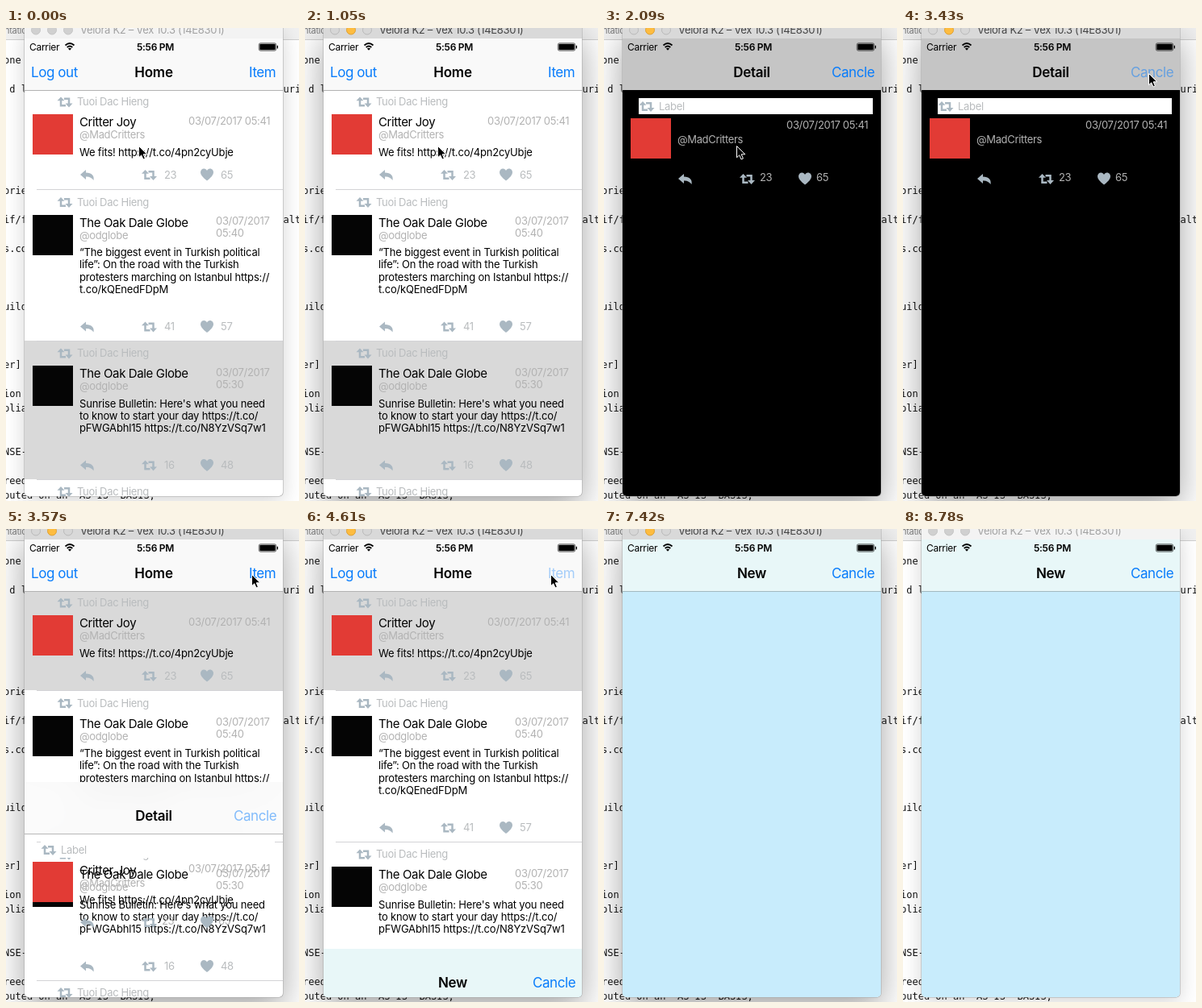
Animation of 363 by 587 pixels, one loop 8.88 s. Source, as an HTML page:

```html
<!DOCTYPE html>
<html lang="en">
<head>
<meta charset="utf-8">
<title>Modal demo</title>
<style>
  html, body { margin: 0; width: 100%; height: 100%; overflow: hidden; background: #fff; }
  svg { display: block; width: 363px; height: 587px; }
  text { font-family: Inter, "Open Sans", sans-serif; letter-spacing: -.025em; white-space: pre; }
  .code { font: 12px "DejaVu Sans Mono", monospace; letter-spacing: 0; fill: #111; }
  .name { font-size: 15px; }
  .body, .soft { font-size: 13px; }
  .body { letter-spacing: -.014em; }
  .soft { fill: #b2b2b2; }
  .faint { font-size: 13px; fill: #b9bcbe; }
  .title { font-size: 17px; font-weight: 600; text-anchor: middle; letter-spacing: -.015em; }
  .link { font-size: 17px; fill: #087cfb; }
  .icon { fill: #aab8c2; }
</style>
</head>
<body>
<svg id="stage" viewBox="0 0 363 587"></svg>
<script>
const LOOP = 8880;
const TICKS = [0, 1050, 1200, 1640, 1790, 1940, 2090, 2540, 2690, 2990, 3130,
  3430, 3570, 3720, 3870, 4020, 4320, 4470, 4620, 4770, 4920, 5060,
  5500, 5790, 5940, 6540, 6680, 6980, 7270, 7420, 8780];
const HEIGHT = 568;

const text = (x, y, cls, str, extra = '') =>
  `<text x="${x}" y="${y}" class="${cls}" ${extra}>${str}</text>`;
const rect = (x, y, w, h, fill, extra = '') =>
  `<rect x="${x}" y="${y}" width="${w}" height="${h}" fill="${fill}" ${extra}/>`;
const use = (id, x, y) => `<use href="#${id}" x="${x}" y="${y}"/>`;
const code = (y, str, col = 0) => text(-3 + col * 7.22, y, 'code', str);

const RED = '#e23b35';
const PERSON = 'Tuoi Dac Hieng';
const PALS = { name: 'Critter Joy', handle: '@MadCritters', color: RED,
  date: ['03/07/2017 05:41'], body: ['We fits! https://t.co/4pn2cyUbje'], counts: [23, 65] };
const GLOBE = { name: 'The Oak Dale Globe', handle: '@odglobe', color: '#050505' };

const actions = (y, textY, counts, x, cls) =>
  use('reply', 92, y - 6) + use('retweet', 168, y - 6) + use('heart', 241, y - 7.5) +
  text(x, textY, cls, counts[0]) + text(x + 70, textY, cls, counts[1]);

const retweeted = top => use('retweet', 63.5, top + 8) + text(88, top + 18.7, 'faint', PERSON);

function cell(top, iconY, post) {
  const dateX = post.date.length > 1 ? 260 : 226;
  return retweeted(top) +
    rect(33, Math.floor(top + 30), 50, 50, post.color) +
    text(91, top + 44.5, 'name', post.name) +
    text(91, top + 59.7, 'soft', post.handle) +
    post.date.map((s, i) => text(dateX, top + 42 + i * 15, 'soft', s)).join('') +
    post.body.map((s, i) => text(91, top + 81 + i * 15.4, 'body', s)).join('') +
    actions(iconY, iconY + 4.5, post.counts, 196, 'faint');
}

const separator = y => rect(38, y, 305, 1, '#d3d3d6');
const navBar = (id, fill, line, title, opacity = 1) =>
  rect(23, 13, 320, 64, fill, `opacity="${opacity}"`) +
  rect(23, 77, 320, 1, line, `id="${id}Line"`) +
  text(183, 61, 'title', title);

const home = rect(23, 13, 320, HEIGHT, '#fff') +
  rect(23, 78, 320, 122, '#d9d9d9', 'id="row1"') +
  rect(23, 388, 320, 172, '#d9d9d9', 'id="row3"') +
  cell(77.5, 182, PALS) + separator(200) +
  cell(202, 370.5, { ...GLOBE, date: ['03/07/2017', '05:40'], counts: [41, 57],
    body: ['“The biggest event in Turkish political', 'life”: On the road with the Turkish',
      'protesters marching on Istanbul https://', 't.co/kQEnedFDpM'] }) + separator(388) +
  cell(389.5, 542.5, { ...GLOBE, date: ['03/07/2017', '05:30'], counts: [16, 48],
    body: ["Sunrise Bulletin: Here's what you need", 'to know to start your day https://t.co/',
      'pFWGAbhl15 https://t.co/N8YzVSq7w1'] }) + separator(560) +
  retweeted(561) +
  navBar('home', '#f9f9f9', '#b2b2b2', 'Home') + text(31, 61, 'link', 'Log out') +
  text(301, 61, 'link', 'Item', 'id="item"');

// The translucent bar shows a blurred copy of the home screen behind it.
const glass = `<g id="glass" clip-path="url(#bar)">${rect(23, 13, 320, 64, '#fff')}
  <g id="behind"><use href="#home" filter="url(#frost)"/></g></g>`;

const detail = rect(23, 13, 320, HEIGHT, '#000', 'id="black"') +
  rect(43, 87, 290, 20, '#fff') + use('retweet', 43.5, 91) + text(68, 101.7, 'faint', 'Label') +
  rect(33, 112, 50, 50, RED) +
  text(91, 127.5, 'name', PALS.name) + text(91, 142.7, 'soft', PALS.handle) +
  text(226, 124.5, 'soft', PALS.date[0]) + text(91, 164, 'body', PALS.body[0]) +
  actions(187, 189.7, PALS.counts, 193, 'soft') +
  glass + navBar('detail', '#fafafa', '#b8b8b8', 'Detail', 0.79) +
  text(282, 61, 'link', 'Cancle', 'id="cancelDetail"');

const compose = rect(23, 13, 320, HEIGHT, '#c8ecfc') +
  navBar('new', '#e8f7f8', '#a3b9c0', 'New') +
  text(282, 61, 'link', 'Cancle', 'id="cancelNew"');

const statusBar = text(29, 27.5, '', 'Carrier', 'font-size="12"') +
  `<path d="M73.5 21.5Q79 16.5 84.5 21.5M75.7 24Q79 21 82.3 24" fill="none" stroke="#000" stroke-width="1.8"/>
   <path d="M79 27.8L76.9 25.5Q79 24 81.1 25.5z"/>` +
  text(185, 27.5, '', '5:56 PM', 'font-size="12" font-weight="600" text-anchor="middle"') +
  rect(313.3, 18.8, 21.4, 9.4, 'none', 'rx="2" stroke="#000" stroke-width=".6"') +
  rect(314.3, 19.8, 19.4, 7.4, '#000', 'rx="1"') + rect(335.7, 21.8, 1.3, 3.6, '#000');

const backdrop = rect(0, 0, 363, 587, '#fff') + rect(0, 0, 363, 14, '#f0f0f0') +
  rect(0, 14, 363, 1, '#cfcfcf') +
  text(-2, 7, '', 'ntatio', 'font-size="11" fill="#777"') +
  code(44, 'one') + code(80, 'd l', 1) + code(80, 'uri', 48) + code(206, 'orie') +
  code(242, 'if/f') + code(242, 'alt', 48) + code(278, 's.co') + code(350, 'uild') +
  code(422, 'er]') + code(458, 'ion') + code(476, 'plia') + code(530, 'NSE-') +
  code(566, 'reed') + code(584, 'puted on an "AS IS" BASIS,');

const lights = [37, 57, 77].map((x, i) =>
  `<circle id="light${i}" cx="${x}" cy="2.5" r="5.5"/>`).join('');

const blur = (id, size) =>
  `<filter id="${id}" x="-50%" y="-50%" width="200%" height="200%"><feGaussianBlur stdDeviation="${size}"/></filter>`;

document.getElementById('stage').innerHTML = `
  <defs>
    <clipPath id="window"><rect x="23" y="-10" width="320" height="591" rx="5"/></clipPath>
    <clipPath id="bar"><rect x="23" y="13" width="320" height="64"/></clipPath>
    ${blur('wide', 22)}${blur('tight', 13)}${blur('frost', 20)}
    <g id="retweet" class="icon">
      <path d="M0 4.8L4.5 0L9 4.8zM10 8L14.5 13L19 8z"/>
      <path d="M4.5 3.5V10.7H10.5M14.5 9.5V2.2H8.5" fill="none" stroke="#aab8c2" stroke-width="2.5"/>
    </g>
    <path id="reply" class="icon" d="M7 0L0 6L7 12V8.5Q13 8 16.5 13Q18 4 7 3.5z"/>
    <path id="heart" class="icon" d="M8 15C3 11 0 8 0 4.5C0 1.8 2 0 4.3 0C6 0 7.3 1 8 2.5C8.7 1 10 0 11.7 0C14 0 16 1.8 16 4.5C16 8 13 11 8 15z"/>
  </defs>
  ${backdrop}
  ${rect(23, 14, 320, 581, '#000', 'id="wideShadow" filter="url(#wide)" opacity=".36"')}
  ${rect(23, 6, 320, 581, '#000', 'id="tightShadow" filter="url(#tight)" opacity=".17"')}
  ${rect(22.5, -10, 321, 591.5, '#a8a8a8', 'rx="5"')}
  <g clip-path="url(#window)">
    ${rect(23, -10, 320, 23, '#f4f4f4', 'id="titleBar"')}
    ${lights}
    ${text(92, 7, '', 'Velora K2 – Vex 10.3 (14E8301)', 'id="caption" font-size="13"')}
    <svg x="23" y="13" width="320" height="568" viewBox="23 13 320 568">
      <g id="home">${home}</g><g id="detail">${detail}</g><g id="compose">${compose}</g>${statusBar}
    </svg>
  </g>
  <path id="cursor" d="M.5 .5V14.8L3.7 11.8L6 17L8.4 16L6.2 10.8H10.8z" stroke="#fff"/>`;

const el = id => document.getElementById(id);
const set = (id, attrs) => { for (const k in attrs) el(id).setAttribute(k, attrs[k]); };
const show = (id, on) => set(id, { visibility: on ? 'visible' : 'hidden' });
const slide = (id, offset) => set(id, { transform: `translate(0 ${Math.round(offset)})` });

// Remaining fraction of a critically damped spring.
function rest(ms) {
  const x = 0.01826 * Math.max(0, ms);
  return (1 + x) * Math.exp(-x);
}

// [time, x, y] of each pointer stop.
const POINTER = [[0, 164, 146], [2540, 238, 98], [2690, 292, 66], [2990, 300, 60], [3130, 304, 56],
  [6540, 250, 210], [6680, 223, 324], [6980, 312, 527], [7270, 325, 566]];

function update(time) {
  const t = TICKS.findLast(tick => tick <= time);
  const active = t >= 1050 && t < 8780;

  show('wideShadow', active);
  show('tightShadow', !active);
  set('titleBar', { fill: active ? '#d9d9d9' : '#f3f3f3' });
  set('caption', { fill: active ? '#454545' : '#a2a2a2' });
  for (let i = 0; i < 3; i++) {
    const amber = active && i === 1;
    set('light' + i, {
      fill: amber ? '#fdbc40' : active ? '#d6d6d6' : '#d0d0d0',
      stroke: amber ? '#dfa134' : active ? '#b9b9b9' : '#c6c6c6'
    });
  }

  show('row1', t >= 1200);
  show('row3', t < 1200);
  set('item', { opacity: t >= 4320 && t < 4620 ? 0.35 : 1 });

  const settled = t >= 2090 && t < 3570;
  const offset = settled ? 0 : HEIGHT * (t < 2090 ? rest(t - 1515) : 1 - rest(t - 3472.8));
  set('detail', { display: t >= 1640 && t < 4020 ? 'inline' : 'none' });
  slide('detail', offset);
  slide('behind', -offset);
  show('black', settled);
  set('glass', { display: settled ? 'none' : 'inline' });
  show('detailLine', !settled);
  set('cancelDetail', { opacity: t >= 3430 ? 0.5 : 1 });

  set('compose', { display: t >= 4470 ? 'inline' : 'none' });
  slide('compose', t >= 5060 ? 0 : HEIGHT * rest(t - 4440));
  set('cancelNew', { opacity: t < 5500 || t >= 5940 ? 1 : t < 5790 ? 0.3 : 0.7 });

  const [, x, y] = POINTER.findLast(stop => stop[0] <= t);
  set('cursor', { transform: `translate(${x} ${y})` });
  show('cursor', t < 7420);
}

function frame() {
  update(performance.now() % LOOP);
  requestAnimationFrame(frame);
}
frame();
</script>
</body>
</html>
```
